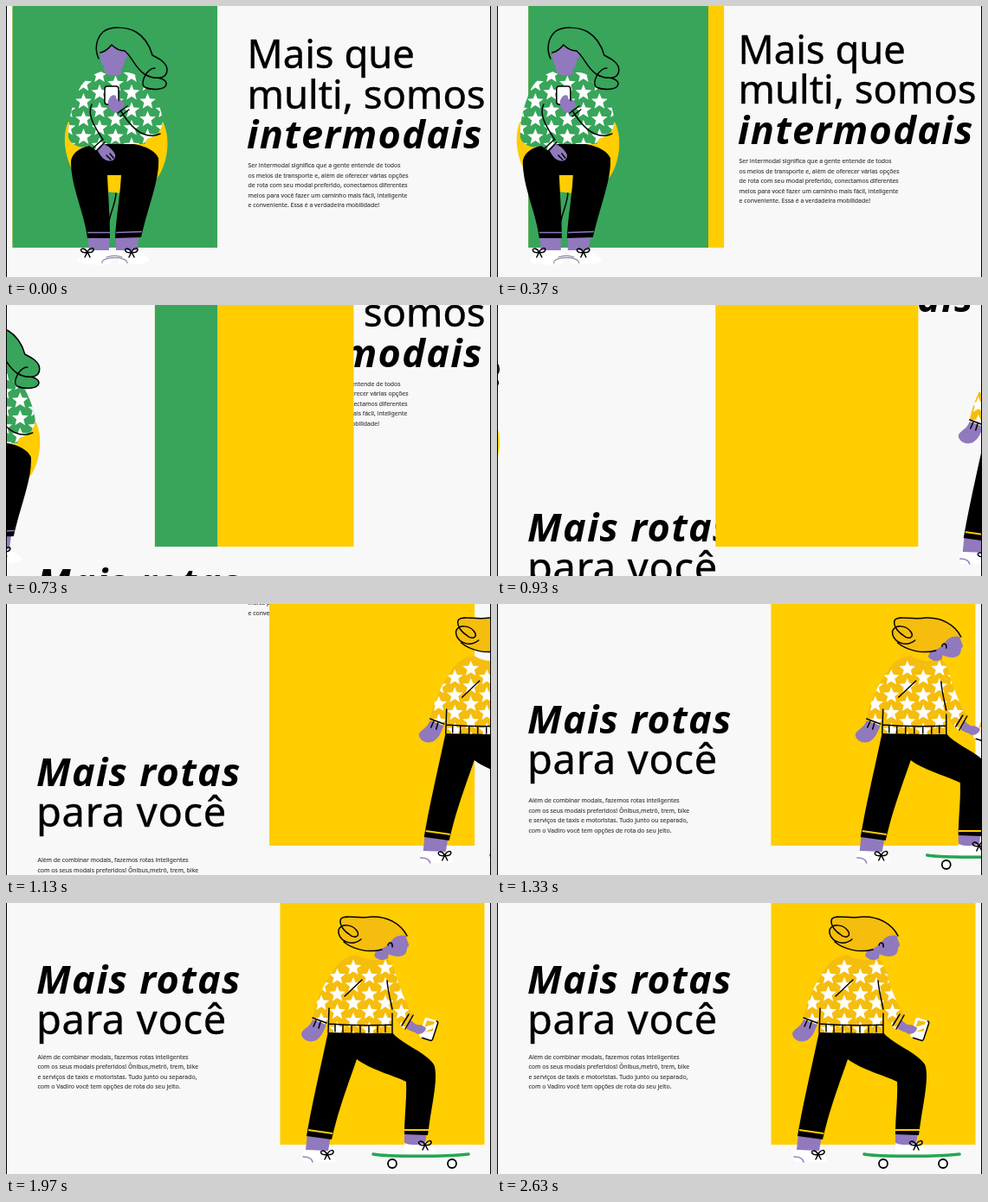
Recreate the animation shown at these times as an HTML page. Size 560 by 314 pixels, loop 2660 ms.

```html
<!DOCTYPE html>
<html lang="pt-BR">
<head>
<meta charset="utf-8">
<title>Rotas</title>
<style>
  html, body { margin: 0; width: 100%; height: 100%; overflow: hidden; background: #f8f8f8; }
  svg { display: block; position: absolute; left: 0; top: 0; }
  text { font-family: "Noto Sans", "Open Sans", sans-serif; }
  .title { font-size: 45.4px; stroke: #000; stroke-width: .4px; }
  .strong { font-size: 45px; font-weight: 600; font-style: italic; letter-spacing: 1.3px; stroke: none; }
  .wide { font-size: 47px; letter-spacing: .7px; }
  .copy { font-size: 6.92px; fill: #333; stroke: #333; stroke-width: .1px; }
  .ink { fill: none; stroke: #000; stroke-width: 1.5; stroke-linecap: round; stroke-linejoin: round; }
  .green { fill: #38a55b; }
  .yellow { fill: #ffcd00; }
  .gold { fill: #f5bd0d; }
  .skin { fill: #9179be; }
  .white { fill: #fff; }
</style>
</head>
<body>
<svg width="560" height="314" viewBox="0 0 560 314">
  <defs>
    <path id="star" class="white" d=""/>
    <path id="bow" class="ink" d="M0 0C-4 -6 -9 -4 -7 -1C-6 1 -2 1 0 0C3 -6 8 -5 7 -2C6 1 2 1 0 0L-3 6M0 0L3 6"/>
    <path id="blouse" d="M110 76C117 81 129 81 136 76C150 78 161 84 167 94C174 106 180 121 181 134C180 146 173 151 163 154L160 160H112L105 168L96 162C86 166 74 161 72 152C71 134 77 113 82 102C87 88 97 80 110 76Z"/>
    <path id="jacket" d="M405 60C414 66 427 68 440 64C446 68 449 77 452 89C457 104 462 117 470 130L461 147C454 141 449 134 445 128L446 151L372 150L373 130L370 141L354 134C357 115 367 93 380 75C386 66 395 61 405 60Z"/>
    <clipPath id="inBlouse"><use href="#blouse"/></clipPath>
    <clipPath id="inJacket"><use href="#jacket"/></clipPath>
  </defs>

  <g id="intro">
    <text class="title" x="278.500" y="72">Mais que</text>
    <text class="title" x="278.500" y="118.500">multi, somos</text>
    <text class="title strong" x="278" y="165">intermodais</text>
  </g>
  <g id="next">
    <text class="title strong" x="35" y="104.500">Mais rotas</text>
    <text class="title wide" x="35" y="151.500">para você</text>
  </g>
  <g id="nextCopy"></g>

  <rect id="panel" class="yellow" height="280"/>
  <rect id="cover" class="green" height="280"/>

  <g id="sitter">
    <path class="yellow" d="M72 134C65 148 67 174 78 192C84 202 92 210 104 214L134 217C158 214 172 207 179 192C187 177 190 151 181 134Z"/>
    <path class="ink" d="M127 217C126 232 119 241 118 256" stroke-width="1.200"/>
    <path class="white" d="M97 280H120L121 298C108 302 90 299 83 296C84 290 92 287 97 280ZM129 280H152C155 288 165 290 166 295C160 300 142 300 130 298Z"/>
    <path class="skin" d="M94 262H119V283H96ZM127 262H154L151 283H127Z"/>
    <path d="M75 181C76 166 94 159 124 158C153 158 171 165 176 176C178 200 164 232 156 268L126 269C127 244 132 220 133 196L117 196C118 220 120 243 120 269L94 269C90 238 75 210 75 181Z"/>
    <path d="M94 262.500L120 262.500M127 262.500L157 261.500" stroke="#9179be" stroke-width="1.500"/>
    <path class="ink" d="M111 298C109 290 140 289 140 298M116 291C122 289 129 289 134 291" style="stroke:#998ca8;stroke-width:1.200"/>
    <use href="#bow" x="94" y="285"/><use href="#bow" x="145" y="285"/>

    <use href="#blouse" class="green"/>
    <g id="blouseStars" clip-path="url(#inBlouse)"></g>
    <path class="green" d="M107 61C102 50 104 38 112 30C121 23 139 24 150 30C160 36 166 46 169 57C177 61 186 66 186 74C186 80 182 83 176 84C184 85 188 90 184 93C177 99 162 97 158 91C151 83 144 74 138 62L137 50Z"/>
    <path class="skin" d="M109 54C114 53 119 49 122 45C127 50 132 52 137 52C142 50 143 57 138 61C137 67 135 71 133 73V78C128 82 118 81 114 77L113 70C110 66 108 60 109 54Z"/>
    <path class="ink" d="M107 61C102 50 104 38 112 30C121 23 139 24 150 30C160 36 166 46 169 57C177 61 186 66 186 74C186 86 170 85 160 79C149 72 146 59 137 52C131 52 126 49 122 45C118 50 114 53 109 54M172 72C163 72 154 89 160 94C166 97 179 98 184 93C188 88 181 83 172 83"/>
    <path class="ink" d="M99 114C93 126 103 141 112 155M100 165L111 155M104 168L114 158M132 121C139 132 148 144 158 148C165 151 172 151 178 148M129 124L140 116M132 128L142 120"/>
    <path class="skin" d="M106 168L113 160C118 162 123 166 126 172C127 178 122 181 117 179C112 178 109 173 106 168ZM117 107C123 102 130 104 134 110L137 116L128 124C121 123 116 115 117 107Z"/>
    <rect class="white" x="114" y="93" width="16" height="21" rx="3" stroke="#000" stroke-width="1.500"/>
    <path class="skin" d="M118 110C120 105 123 102 127 104C126 108 131 109 132 113C134 119 129 123 124 121C120 119 117 115 118 110Z"/>
    <path class="ink" d="M116 173L121 178M120 171L124 176" stroke-width="1"/>
  </g>

  <g id="skater">
    <path class="white" d="M346 284L373 285C378 290 381 295 380 300L344 300C340 294 342 289 346 284ZM460 276L485 276C487 282 496 283 497 290H460Z"/>
    <path class="skin" d="M348 266L375 270L372 287L346 286ZM460 260H487L484 278C476 281 467 281 460 278Z"/>
    <path d="M372 149L446 150C456 163 485 173 494 187C500 202 491 235 487 269L460 268C460 246 463 226 462 207C448 200 421 193 405 181C397 205 384 238 376 274L347 270C353 234 363 192 372 149Z"/>
    <path d="M349 263L377 267M460 263L488 263" stroke="#ffcd00" stroke-width="2"/>
    <path class="ink" d="M343 294C350 294 353 296 354 300" style="stroke:#9179be"/>
    <use href="#bow" x="371" y="291"/><use href="#bow" x="484" y="280"/>
    <path class="ink" d="M424 291C438 294 513 294 534 291" style="stroke:#25a653;stroke-width:3.500"/>
    <g class="white" stroke="#000" stroke-width="1.800"><circle cx="446" cy="302" r="5"/><circle cx="515" cy="302" r="5"/></g>

    <path class="skin" d="M354 135L370 141C367 147 365 155 358 159C350 163 341 158 341 151C343 145 350 145 354 135ZM464 133L470 138C474 143 482 141 486 145C486 151 477 154 463 146Z"/>
    <path class="skin" d="M428 48H443L441 64C436 69 429 66 426 60Z"/>
    <use href="#jacket" class="gold"/>
    <g id="jacketStars" clip-path="url(#inJacket)"></g>
    <path class="skin" d="M430 50L443 54L440 64C435 68 428 65 425 61Z"/>
    <path class="skin" d="M439 44C446 34 457 35 462 38C462 43 466 47 465 50C462 51 464 55 461 59C456 64 444 62 438 57Z"/>
    <path class="gold" d="M386 19C393 13 408 17 424 16C441 15 455 25 463 38C454 36 448 39 444 45C437 57 411 58 396 50C380 43 381 28 389 26Z"/>
    <path class="ink" d="M410 42C398 52 382 42 384 31C387 24 399 24 405 32C410 39 402 42 396 36C388 31 384 22 387 18C392 13 407 19 422 16C440 15 456 24 463 38M390 45C401 54 418 58 434 54"/>
    <path class="ink" d="M441 49C442 44 447 46 446 51" stroke-width="1"/>
    <path class="ink" d="M411 89L391 108M373 122L372 150M446 128V151M440 90C441 102 444 113 446 123M373 140C398 142 423 142 446 141M380 141V149M389 142V150M399 142V150M409 142V150M419 142V150M429 142V150M438 141V150M354 133L370 139M358 136L355 143M363 138L361 145M461 146L470 130M457 142L465 129"/>
    <g transform="rotate(18 488 146)">
      <rect class="white" x="480" y="134" width="16" height="24" rx="2.500"/>
      <path class="gold" d="M483 137L492 136V139L483 145ZM485 150L493 143V147Z"/>
      <path class="ink" d="M494 134.500Q496 134.500 496 136.500V155.500Q496 158 494 158H484"/>
    </g>
    <path class="skin" d="M472 144C476 139 482 142 485 145C484 150 479 153 473 151Z"/>
  </g>

  <path d="M.5 0V314M559.500 0V314" stroke="#000"/>
</svg>
<script>
const $ = id => document.getElementById(id);
const NS = 'http://www.w3.org/2000/svg';
const LOOP = 2660, SEAM = 244;

function add(parent, tag, attrs, label = '') {
  const el = document.createElementNS(NS, tag);
  for (const key in attrs) el.setAttribute(key, attrs[key]);
  el.textContent = label;
  parent.append(el);
}

function addCopy(parent, x, y, lines) {
  lines.forEach((line, i) => add(parent, 'text', { class: 'copy', x, y: y + i * 11.5 }, line));
}

addCopy($('intro'), 279.5, 187.3, [
  'Ser intermodal significa que a gente entende de todos',
  'os meios de transporte e, além de oferecer várias opções',
  'de rota com seu modal preferido, conectamos diferentes',
  'meios para você fazer um caminho mais fácil, inteligente',
  'e conveniente. Essa é a verdadeira mobilidade!'
]);
addCopy($('nextCopy'), 36.5, 180.6, [
  'Além de combinar modais, fazemos rotas inteligentes',
  'com os seus modais preferidos! Ônibus,metrô, trem, bike',
  'e serviços de taxis e motoristas. Tudo junto ou separado,',
  'com o Vadiro você tem opções de rota do seu jeito.'
]);

const starPoints = Array.from({ length: 10 }, (_, i) => {
  const r = i % 2 ? 4.3 : 9.8, a = i * Math.PI / 5;
  return `${(r * Math.sin(a)).toFixed(2)} ${(-r * Math.cos(a)).toFixed(2)}`;
});
$('star').setAttribute('d', `M${starPoints.join('L')}Z`);

// Staggered columns of stars
function addStars(parent, x0, y0, cols, rows) {
  for (let c = 0; c < cols; c++)
    for (let r = 0; r < rows; r++)
      add(parent, 'use', { href: '#star', x: x0 + c * 18.5, y: y0 + r * 20.5 + (c % 2) * 10.2 });
}
addStars($('blouseStars'), 71, 80, 7, 5);
addStars($('jacketStars'), 364, 75, 7, 5);

// Monotone cubic through [time, value] pairs
function track(...pts) {
  const last = pts.length - 1;
  const slope = i => (pts[i + 1][1] - pts[i][1]) / (pts[i + 1][0] - pts[i][0]);
  const tangent = pts.map((_, i) => {
    if (i === 0 || i === last) return 0;
    const a = slope(i - 1), b = slope(i);
    return a * b > 0 ? 2 * a * b / (a + b) : 0;
  });
  return t => {
    if (t <= pts[0][0]) return pts[0][1];
    if (t >= pts[last][0]) return pts[last][1];
    const i = pts.findIndex(p => p[0] > t) - 1;
    const [t0, v0] = pts[i], [t1, v1] = pts[i + 1];
    const h = t1 - t0, u = (t - t0) / h, w = 1 - u;
    return v0 * w * w * (1 + 2 * u) + v1 * u * u * (3 - 2 * u)
      + h * u * w * (w * tangent[i] - u * tangent[i + 1]);
  };
}

const scroll = track([120, 0], [370, 5], [550, 37], [730, 93], [930, 157], [1130, 220], [1330, 281], [1530, 323], [1640, 327]);
const copyLag = track([700, 24], [1130, 12], [1500, 0]);
const left = track([0, 7.5], [180, 12.5], [370, 36], [550, 97], [730, 171.5], [930, 252], [1130, 304], [1350, 316.5]);
const right = track([0, 244], [200, 247], [370, 262], [550, 323], [730, 401], [930, 486], [1130, 541], [1350, 552.5]);
const sitterX = track([0, 0], [180, -13], [370, -45], [550, -96], [730, -147], [900, -179], [1080, -200]);
const skaterX = track([400, 300], [730, 238], [930, 192], [1130, 136], [1330, 73], [1530, 27], [1740, 5], [1960, 0]);

const move = (id, x, y) => $(id).setAttribute('transform', `translate(${x.toFixed(2)} ${y.toFixed(2)})`);
function span(id, a, b) {
  $(id).setAttribute('x', a);
  $(id).setAttribute('width', Math.max(0, b - a));
}

function draw(t) {
  const y = scroll(t), a = left(t), b = right(t);
  move('intro', 0, -y);
  move('next', 0, 327 - y);
  move('nextCopy', 0, 327 - y + copyLag(t));
  span('panel', a, b);
  span('cover', a, Math.min(b, SEAM));
  move('sitter', sitterX(t), 0);
  move('skater', skaterX(t), 0);
}

const start = performance.now();
function tick() {
  draw((performance.now() - start) % LOOP);
  requestAnimationFrame(tick);
}
tick();
</script>
</body>
</html>
```
